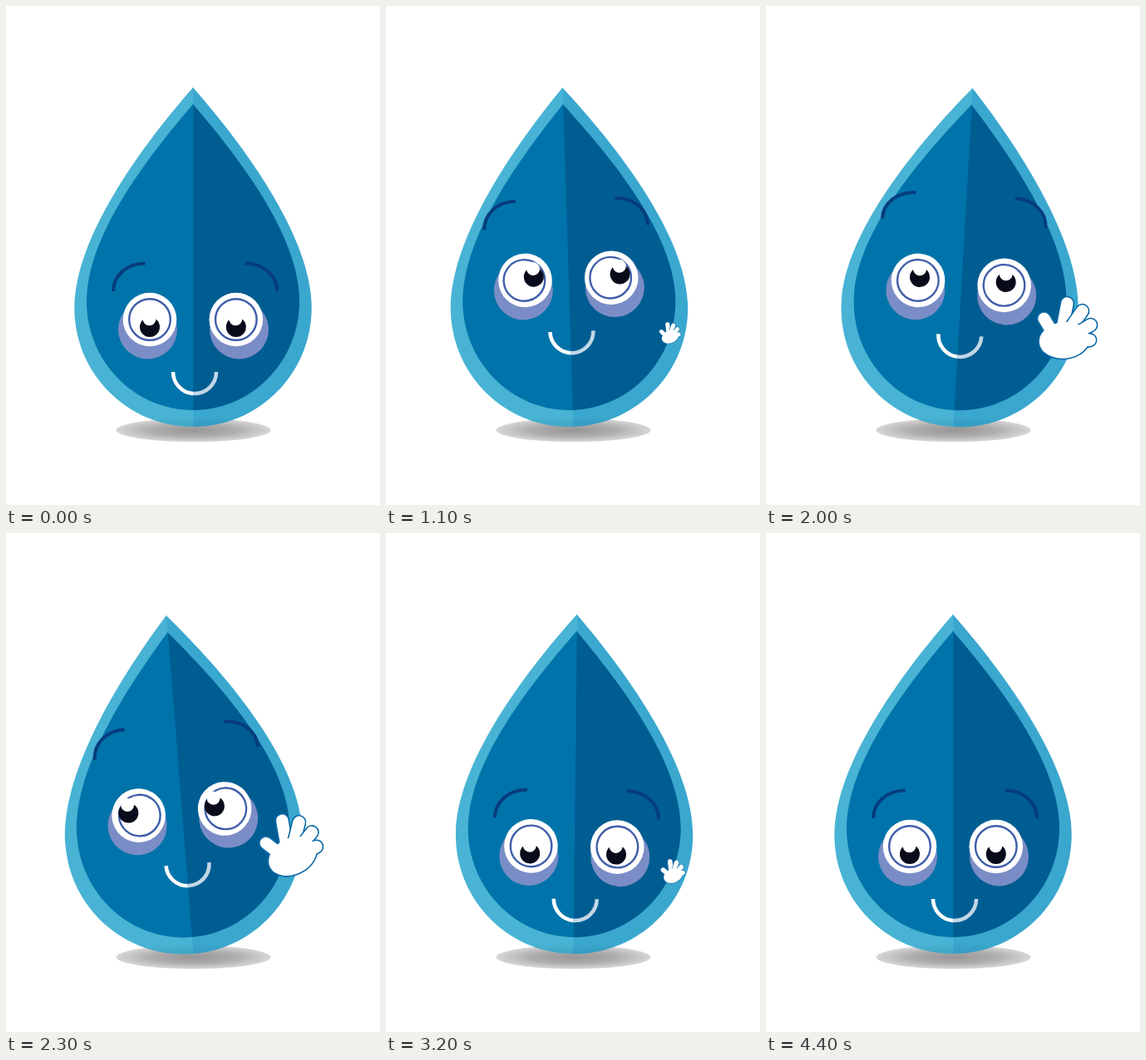
An HTML page with a canvas for the animation above (5000 ms loop, 450x600 px).

```html
<!DOCTYPE html>
<html lang="en">
<head>
<meta charset="utf-8">
<title>Waving drop</title>
<style>
html, body { margin: 0; width: 100%; height: 100%; overflow: hidden; background: #fff; }
canvas { display: block; width: 450px; height: 600px; }
</style>
</head>
<body>
<canvas id="stage" width="450" height="600"></canvas>
<script>
const ctx = document.getElementById('stage').getContext('2d');
const LOOP = 5000, STEP = 100;
const BASE_X = 225, BASE_Y = 506;

// Sine ease from 0 to 1 between two times.
function ease(t, from, to) {
  const p = Math.min(1, Math.max(0, (t - from) / (to - from)));
  return (1 - Math.cos(Math.PI * p)) / 2;
}

function pose(t) {
  const e = (from, to) => ease(t, from, to);
  const raise = e(640, 1120);
  const lower = e(2450, 3100);
  const hop = Math.min(1, Math.max(0, (t - 3700) / 700));
  return {
    lean: -.125 * e(1000, 1300) + .25 * e(1300, 1780) - .208 * e(1780, 2350)
      + .138 * e(2350, 2850) - .055 * e(2850, 3350),
    stretch: 1 + .07 * Math.sin(Math.PI * hop),
    faceY: -49 * raise + 7 * e(1700, 2200) + 42 * lower,
    browX: -3.5 * (raise - lower),
    browY: -77 * raise - 11 * e(1300, 1600) + 9 * e(1700, 2200) + 79 * e(2450, 2900),
    gazeX: 10.5 * raise - 22.5 * e(1850, 2200) + 12 * e(2800, 3300),
    gazeY: 9 - 13 * (raise - lower),
    handSize: e(1000, 1250) - e(3000, 3350),
    handX: 344 + 6 * e(1100, 1500) - 7 * e(2300, 2750),
    handY: 400 - 11 * e(1100, 1500) + 20 * e(1900, 3100),
    handTurn: .1 + .27 * e(1100, 1600) - .53 * e(1750, 2750) + .2 * e(2750, 3100)
  };
}

function disc(x, y, r, color) {
  ctx.fillStyle = color;
  ctx.beginPath();
  ctx.arc(x, y, r, 0, 7);
  ctx.fill();
}

function shadow() {
  ctx.save();
  ctx.translate(225.5, 510);
  ctx.scale(93, 14);
  const g = ctx.createRadialGradient(0, 0, 0, 0, 0, 1);
  g.addColorStop(0, '#a3a1a2');
  g.addColorStop(.55, '#b9b7b8');
  g.addColorStop(1, '#dddcdc');
  disc(0, 0, 1, g);
  ctx.restore();
}

// Half a drop; side is -1 for left, 1 for right.
function halfDrop(side, top, [x1, y1], y2, [wide, mid], bottom, color) {
  const x = d => 225 + side * d;
  ctx.fillStyle = color;
  ctx.beginPath();
  ctx.moveTo(225, top);
  ctx.bezierCurveTo(x(x1), y1, x(wide), y2, x(wide), mid);
  ctx.bezierCurveTo(x(wide), mid + (bottom - mid) * .552, x(wide * .552), bottom, 225, bottom);
  ctx.lineTo(x(-.4), bottom);
  ctx.lineTo(x(-.4), top);
  ctx.fill();
}

function body() {
  const outer = [98, [65, 172], 280, [142.7, 363], 506];
  const inner = [118, [53, 180], 275, [128, 355], 486];
  halfDrop(1, ...outer, '#3aa7cf');
  halfDrop(-1, ...outer, '#48b3d4');
  halfDrop(1, ...inner, '#005d92');
  halfDrop(-1, ...inner, '#0074aa');
}

function eye(shadeX, x, gx, gy) {
  disc(shadeX, 389, 35.5, '#7b8dc6');
  disc(x, 377, 32.3, '#fff');
  ctx.strokeStyle = '#3f5ea9';
  ctx.lineWidth = 2.4;
  ctx.beginPath();
  ctx.arc(x - gx * .1, 377, 24.8, 0, 7);
  ctx.stroke();
  disc(x + gx, 377 + gy, 12, '#090b1b');
  disc(x + gx - .5, 367.3 + gy, 8, '#fff');
}

function mouth() {
  const split = Math.PI / 2 + .077;
  const arc = (from, to, color) => {
    ctx.strokeStyle = color;
    ctx.beginPath();
    ctx.arc(227, 440, 26, from, to);
    ctx.stroke();
  };
  ctx.lineWidth = 4.5;
  arc(0, split, '#c3d7e6');
  arc(split, Math.PI, '#fff');
}

function brows() {
  ctx.lineWidth = 4;
  ctx.strokeStyle = '#063c7d';
  for (const side of [-1, 1]) {
    const x = d => 227.6 + side * d;
    ctx.beginPath();
    ctx.moveTo(x(60), 309.5);
    ctx.bezierCurveTo(x(82), 309.5, x(98.5), 324, x(98.5), 343);
    ctx.stroke();
  }
}

// Round-tipped finger; angle is measured from straight up.
function finger(angle, length) {
  const reach = length - 8.5;
  ctx.beginPath();
  ctx.moveTo(0, 10);
  ctx.lineTo(reach * Math.sin(angle), 10 - reach * Math.cos(angle));
  for (const [color, width] of [['#0b68a6', 17.6], ['#fff', 14.4]]) {
    ctx.strokeStyle = color;
    ctx.lineWidth = width;
    ctx.stroke();
  }
}

function palm(grow, color) {
  ctx.fillStyle = color;
  ctx.beginPath();
  ctx.ellipse(4, 4, 31 + grow, 22.5 + grow, -.45, 0, 7);
  ctx.fill();
}

function hand(p) {
  if (p.handSize < .02) return;
  ctx.save();
  ctx.translate(p.handX, p.handY);
  ctx.rotate(p.handTurn);
  ctx.scale(p.handSize, p.handSize);
  ctx.lineCap = 'round';
  palm(.8, '#0b68a6');
  finger(-.9, 44);
  for (let i = 0; i < 4; i++) finger(-.16 + .42 * i, 58 - 1.4 * i * i);
  palm(-.8, '#fff');
  ctx.restore();
}

function draw(t) {
  const p = pose(t);
  ctx.fillStyle = '#fff';
  ctx.fillRect(0, 0, 450, 600);
  shadow();
  ctx.save();
  ctx.translate(BASE_X, BASE_Y);
  ctx.rotate(p.lean);
  ctx.scale(1, p.stretch);
  ctx.translate(-BASE_X, -BASE_Y);
  body();
  ctx.save();
  ctx.translate(p.browX, p.browY);
  brows();
  ctx.restore();
  ctx.save();
  ctx.translate(0, p.faceY);
  eye(170.5, 173, p.gazeX, p.gazeY);
  eye(280.5, 276.8, p.gazeX, p.gazeY);
  mouth();
  ctx.restore();
  hand(p);
  ctx.restore();
  // The shadow also tints the foot of the drop.
  ctx.save();
  ctx.globalAlpha = .2;
  ctx.globalCompositeOperation = 'multiply';
  shadow();
  ctx.restore();
}

const start = performance.now();
function tick() {
  const t = (performance.now() - start) % LOOP;
  draw(Math.floor(t / STEP) * STEP);
  requestAnimationFrame(tick);
}
tick();
</script>
</body>
</html>
```
